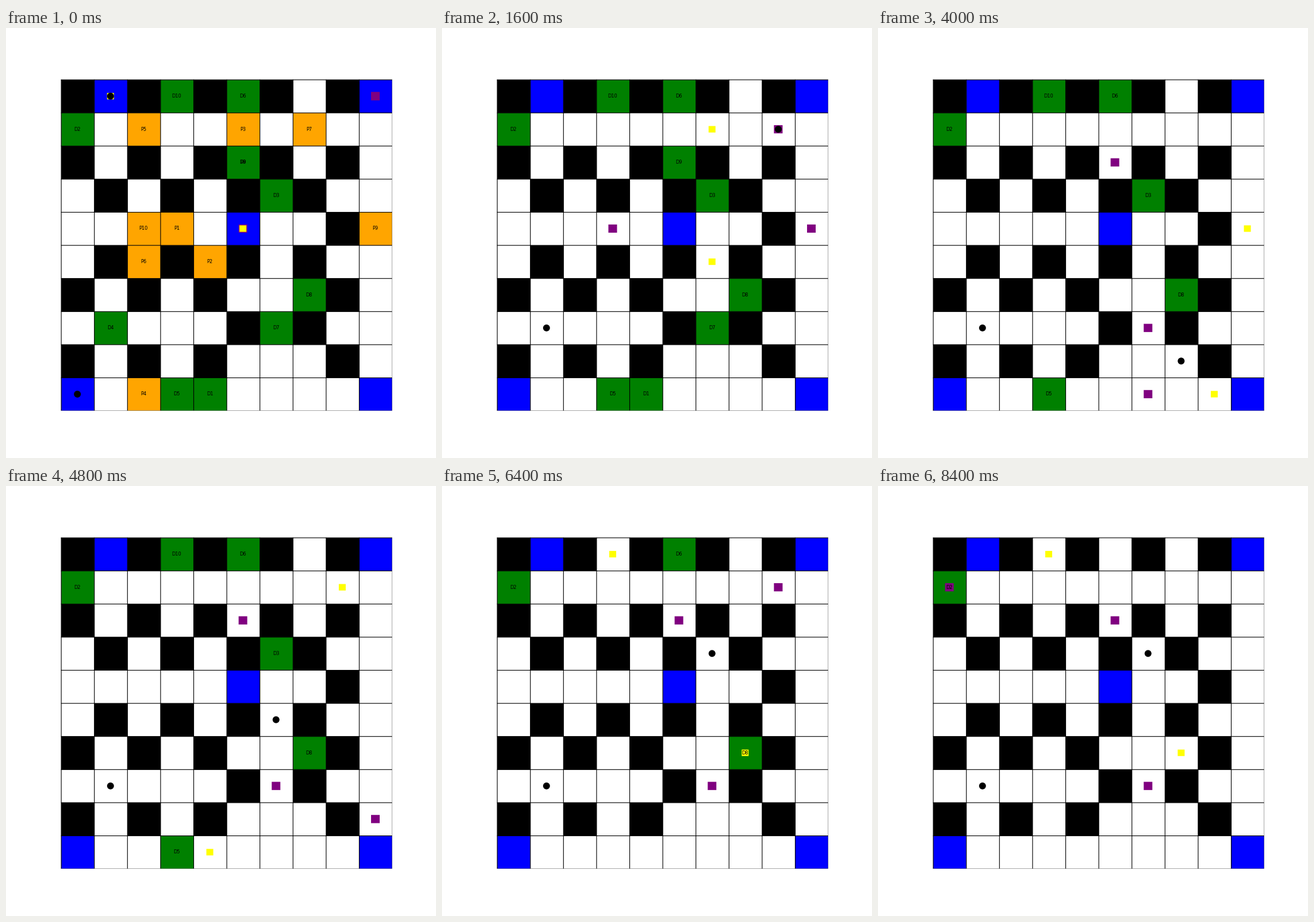
Animation, 748 px wide and 748 px high, one loop 8600 ms. Source, as a matplotlib script:

```python
import matplotlib.pyplot as plt
from matplotlib.animation import FuncAnimation
from matplotlib.patches import Circle, Rectangle

FRAMES, STEP_MS = 43, 200
CELL, LEFT, TOP = 77, 128.5, 120.5   # stage is 1000 units wide

MAZE = """
#B#.#.#.#B
..........
#.#.#.#.#.
.#.#.#.#..
.....B..#.
.#.#.#.#..
#.#.#...#.
.....#.#..
#.#.#...#.
B........B
""".split()

# "column row" of every pickup and drop-off
TASKS = dict(
    P1="34", P2="45", P3="51", P4="29", P5="21",
    P6="25", P7="71", P8="52", P9="94", P10="24",
    D1="49", D2="01", D3="63", D4="17", D5="39",
    D6="50", D7="67", D8="76", D9="52", D10="30",
)

# Corners and task stops of each agent, later agents lie on top
ROUTES = [
    ("purple", "54 44 P2 44 P1 24 P6 24 64 68 69 D1 99 91 51 D6 51 D2"),
    ("purple", "90 91 P7 91 99 79 78 68 D7"),
    ("purple", "90 P9 91 51 D9"),
    ("yellow", "10 11 P5 51 P8 51 91 99 D5 59 58 68 66 D8"),
    ("yellow", "54 P10 64 68 69 99 91 31 D10"),
    ("black", "09 P4 19 D4"),
    ("black", "10 11 P3 91 99 79 78 68 D3"),
]
SIZES = {"purple": (20.08, 19.08), "yellow": (16.08, 15.08)}


def cell(stop):
    col, row = TASKS.get(stop, stop)
    return int(col), int(row)


def center(col, row):
    return LEFT - 1 + CELL * (col + 0.5), TOP - 0.5 + CELL * (row + 0.5)


def walk(route):
    """Cells visited one per step, and the step at which each task is reached."""
    stops = route.split()
    path, reached = [cell(stops[0])], {}
    for stop in stops[1:]:
        goal = cell(stop)
        while path[-1] != goal:
            path.append(tuple(a + (b > a) - (b < a)
                              for a, b in zip(path[-1], goal)))
        if stop in TASKS:
            reached[stop] = len(path) - 1
    return path, reached


fig = plt.figure(figsize=(10, 10), dpi=74.8, facecolor="white")
ax = fig.add_axes([0, 0, 1, 1])
ax.set_xlim(0, 1000)
ax.set_ylim(1000, 0)
ax.axis("off")


def box(x, y, w, h, color, z):
    return ax.add_patch(Rectangle((x, y), w, h, facecolor=color, lw=0,
                                  snap=False, zorder=z))


def fill(col, row, color, z):
    return box(LEFT + CELL * col, TOP + CELL * row, CELL, CELL, color, z)


for row, line in enumerate(MAZE):
    for col, kind in enumerate(line):
        if kind != ".":
            fill(col, row, "black" if kind == "#" else "blue", 1)

tiles = {}
for name in TASKS:
    col, row = cell(name)
    pickup = name[0] == "P"
    face = fill(col, row, "orange" if pickup else "green", 2 if pickup else 2.5)
    label = ax.text(*center(col, row), name, fontsize=8, family="DejaVu Sans",
                    ha="center", va="center", zorder=9)
    tiles[name] = face, label

marks = [CELL * i for i in range(11)]
ax.vlines([LEFT + m for m in marks], TOP - 0.5, TOP + 10 * CELL,
          color="black", lw=1.1, snap=False, zorder=3)
ax.hlines([TOP + m for m in marks], LEFT - 0.5, LEFT + 10 * CELL,
          color="black", lw=1.1, snap=False, zorder=3)

# The board is cut off inside its right and bottom border
box(898, 0, 102, 1000, "white", 4)
box(0, 890, 1000, 110, "white", 4)

agents, reached = [], {}
for i, (color, route) in enumerate(ROUTES):
    path, done = walk(route)
    reached.update(done)
    z = 5 + 0.1 * i
    if color == "black":
        shape = ax.add_patch(Circle((0, 0), 7.98, color=color, lw=0, zorder=z))
    else:
        shape = box(0, 0, *SIZES[color], color, z)
    agents.append((shape, path))


def update(step):
    for shape, path in agents:
        x, y = center(*path[min(step, len(path) - 1)])
        if isinstance(shape, Circle):
            shape.set_center((x, y))
        else:
            shape.set_xy((x - shape.get_width() / 2, y - shape.get_height() / 2))
    for name, parts in tiles.items():
        for part in parts:
            part.set_visible(step <= reached[name])
    return []


anim = FuncAnimation(fig, update, frames=FRAMES, interval=STEP_MS,
                     init_func=lambda: update(0), repeat=True, repeat_delay=0)
plt.show()
```
